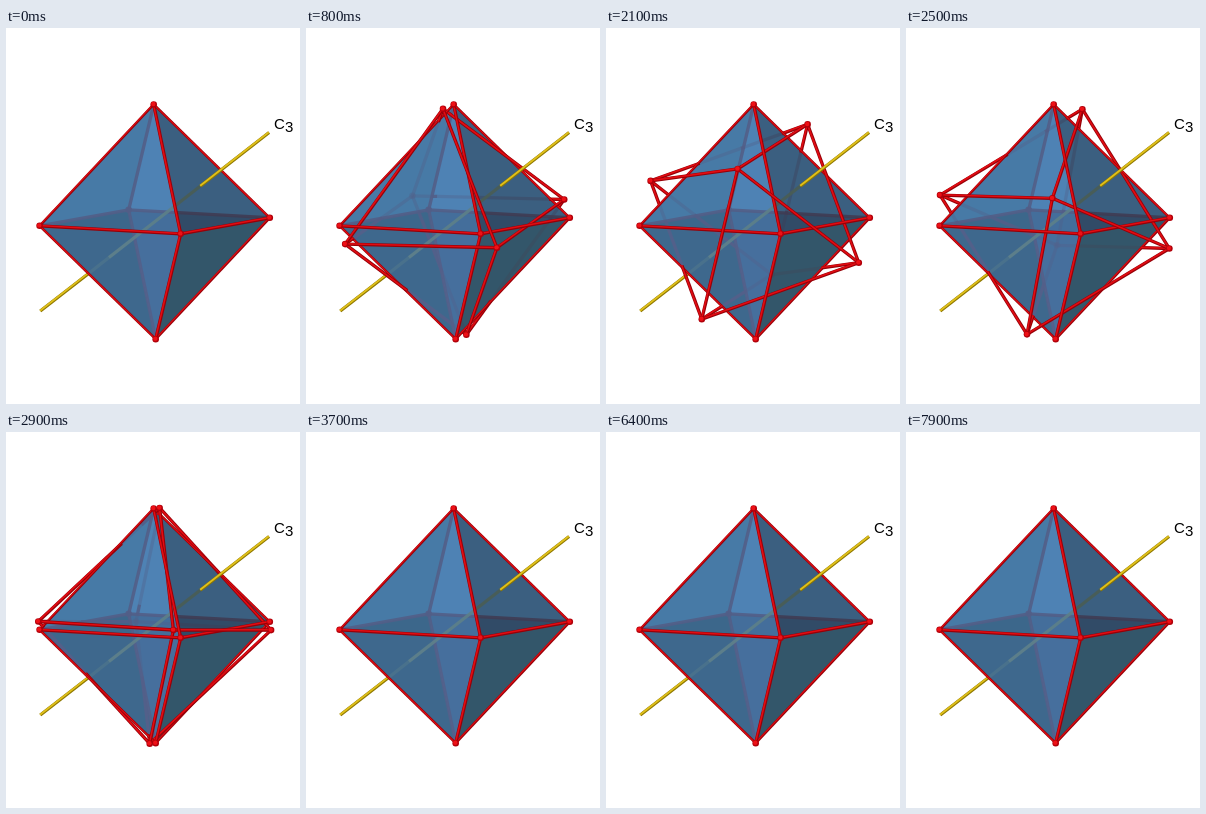
These frames come from a looping animation (294 px wide and 376 px high, 8000 ms). An HTML page with a canvas:

```html
<!DOCTYPE html>
<html lang="en">
<head>
<meta charset="utf-8">
<title>C3 rotation of an octahedron</title>
<style>
  html, body { margin: 0; width: 100%; height: 100%; overflow: hidden; background: #fff; }
  canvas { position: absolute; left: 0; top: 0; width: 294px; height: 376px; }
  span { position: absolute; font: 15px/16px "Liberation Sans", Arial, sans-serif; color: #000; }
</style>
</head>
<body>
<canvas id="stage"></canvas>
<span style="left:268px;top:88px">C</span><span style="left:279px;top:91px">3</span>
<script>
const LOOP = 8000, STEP = 100;
const CX = 148.7, CY = 193.8, SIZE = 118;
const TURN = [[500, 0], [1300, 36], [2100, 72], [2900, 113.6], [3030, 120]];

const canvas = document.getElementById('stage');
const ctx = canvas.getContext('2d');
const ratio = window.devicePixelRatio || 1;
canvas.width = 294 * ratio;
canvas.height = 376 * ratio;

// Vectors are x right, y down, z towards the viewer.
const dot = (a, b) => a[0] * b[0] + a[1] * b[1] + a[2] * b[2];
const scale = (a, k) => a.map(c => c * k);
const unit = a => scale(a, 1 / Math.sqrt(dot(a, a)));
const mix = (a, b, k) => a.map((c, i) => c + (b[i] - c) * k);
const cross = (a, b) => [
  a[1] * b[2] - a[2] * b[1],
  a[2] * b[0] - a[0] * b[2],
  a[0] * b[1] - a[1] * b[0]
];

const axes = [[-1, -117.5, 12.5], [115, -4, -25.7], [26, 12, 114.5]].map(unit);
const [T, R, F, B, L, K] = [...axes, ...axes.map(a => scale(a, -1))].map(a => scale(a, SIZE));
const corners = [T, R, F, B, L, K];
const axis = unit([0, 1, 2].map(i => T[i] + R[i] + F[i]));

const edges = [];
for (let i = 0; i < 6; i++)
  for (let j = i + 1; j < 6; j++)
    if (j !== i + 3) edges.push([i, j]);

const backFaces = [
  [[T, L, K], 'rgb(60,100,140)'],
  [[T, K, R], 'rgb(85,128,190)'],
  [[B, L, K], 'rgb(22,34,43)'],
  [[B, K, R], 'rgb(49,57,100)']
];
const frontFaces = [
  [[T, L, F], 'rgba(75,131,176,.72)'],
  [[T, F, R], 'rgba(49,82,104,.72)'],
  [[L, F, B], 'rgba(78,132,179,.72)'],
  [[F, R, B], 'rgba(52,97,108,.72)']
];

// Rods: shaded side, lit side, colour inside the solid, widths.
const RED = { dark: '#960008', light: '#e20c12', deep: '#64001e', wide: 3.3, thin: 1.6 };
const RIM = { ...RED, wide: 2.5, thin: 1.1 };
const GOLD = { dark: '#8f7800', light: '#e0c01a', deep: '#8c7a20', wide: 3.2, thin: 1.7 };
const VISIBLE = 1, INSIDE = 0.9, BEHIND = 0.35;

function rotate(v, deg) {
  const a = deg * Math.PI / 180, c = Math.cos(a), s = Math.sin(a);
  const w = cross(axis, v), along = dot(axis, v) * (1 - c);
  return v.map((x, i) => x * c + w[i] * s + axis[i] * along);
}

// Below 1 inside the solid, 1 on its surface.
const level = p => axes.reduce((sum, e) => sum + Math.abs(dot(e, p)), 0) / SIZE;

// How strongly a point shows: in front of the solid, in it or behind it.
function strength(p) {
  const here = level(p);
  if (here < 0.985) return INSIDE;
  const covered = axes.some(e => {
    const dz = -dot(e, p) / e[2];
    return dz > 0 && level([p[0], p[1], p[2] + dz]) < 0.99;
  });
  return !covered ? VISIBLE : here < 1.01 ? INSIDE : BEHIND;
}

// Cut a rod wherever its strength changes.
function cut(a, b, paint) {
  const N = 80, runs = [];
  for (let i = 0; i < N; i++) {
    const show = strength(mix(a, b, (i + 0.5) / N));
    const last = runs[runs.length - 1];
    if (last && last.show === show) last.to = (i + 1) / N;
    else runs.push({ show, from: i / N, to: (i + 1) / N });
  }
  return runs.map(r => {
    const p = mix(a, b, r.from), q = mix(a, b, r.to);
    return { p, q, show: r.show, z: p[2] + q[2], paint };
  });
}

function drawRod({ p, q, show, paint }) {
  ctx.globalAlpha = show;
  const pass = (color, width, shift) => {
    ctx.strokeStyle = color;
    ctx.lineWidth = width;
    ctx.beginPath();
    ctx.moveTo(CX + p[0] - shift, CY + p[1] - shift);
    ctx.lineTo(CX + q[0] - shift, CY + q[1] - shift);
    ctx.stroke();
  };
  if (show < VISIBLE) return pass(paint.deep, paint.wide, 0);
  pass(paint.dark, paint.wide, 0);
  pass(paint.light, paint.thin, 0.3);
}

function drawBall({ p, show }) {
  ctx.globalAlpha = show;
  const disc = (color, r, shift) => {
    ctx.fillStyle = color;
    ctx.beginPath();
    ctx.arc(CX + p[0] - shift, CY + p[1] - shift, r, 0, 7);
    ctx.fill();
  };
  if (show < VISIBLE) return disc(RED.deep, 3.3, 0);
  disc('#b0000a', 3.3, 0);
  disc('#ee1016', 2.2, 0.4);
}

function drawFace([points, color]) {
  ctx.globalAlpha = 1;
  ctx.fillStyle = color;
  ctx.beginPath();
  points.forEach(p => ctx.lineTo(CX + p[0], CY + p[1]));
  ctx.fill();
}

function wireframe(points, paintOf) {
  return {
    rods: edges.flatMap(([i, j]) => cut(points[i], points[j], paintOf(points[i], points[j]))),
    balls: points.map(p => ({ p, show: strength(p) }))
  };
}

// Outline edges of the solid are half sunk into its faces.
const isRim = (...ends) => !ends.includes(F) && !ends.includes(K);
const fixed = wireframe(corners, (a, b) => isRim(a, b) ? RIM : RED);
const pole = cut(scale(axis, -167), scale(axis, 167), GOLD);

function angleAt(t) {
  const next = TURN.findIndex(k => t < k[0]);
  if (next === 0) return 0;
  if (next < 0) return 120;
  const [t0, a0] = TURN[next - 1], [t1, a1] = TURN[next];
  return a0 + (a1 - a0) * (t - t0) / (t1 - t0);
}

function draw(t) {
  const angle = angleAt(t);
  const rods = [...pole, ...fixed.rods], balls = [...fixed.balls];
  if (angle > 0 && angle < 120) {
    const moving = wireframe(corners.map(p => rotate(p, -angle)), () => RED);
    rods.push(...moving.rods);
    balls.push(...moving.balls);
  }
  rods.sort((a, b) => a.z - b.z);
  const hidden = o => o.show < VISIBLE, seen = o => o.show === VISIBLE;

  ctx.setTransform(ratio, 0, 0, ratio, 0, 0);
  ctx.globalAlpha = 1;
  ctx.fillStyle = '#fff';
  ctx.fillRect(0, 0, 294, 376);
  backFaces.forEach(drawFace);
  rods.filter(hidden).forEach(drawRod);
  balls.filter(hidden).forEach(drawBall);
  frontFaces.forEach(drawFace);
  rods.filter(seen).forEach(drawRod);
  balls.filter(seen).forEach(drawBall);
}

const start = performance.now();
let shown = -1;
function tick() {
  const t = Math.floor((performance.now() - start) % LOOP / STEP) * STEP;
  if (t !== shown) draw(shown = t);
  requestAnimationFrame(tick);
}
tick();
</script>
</body>
</html>
```
